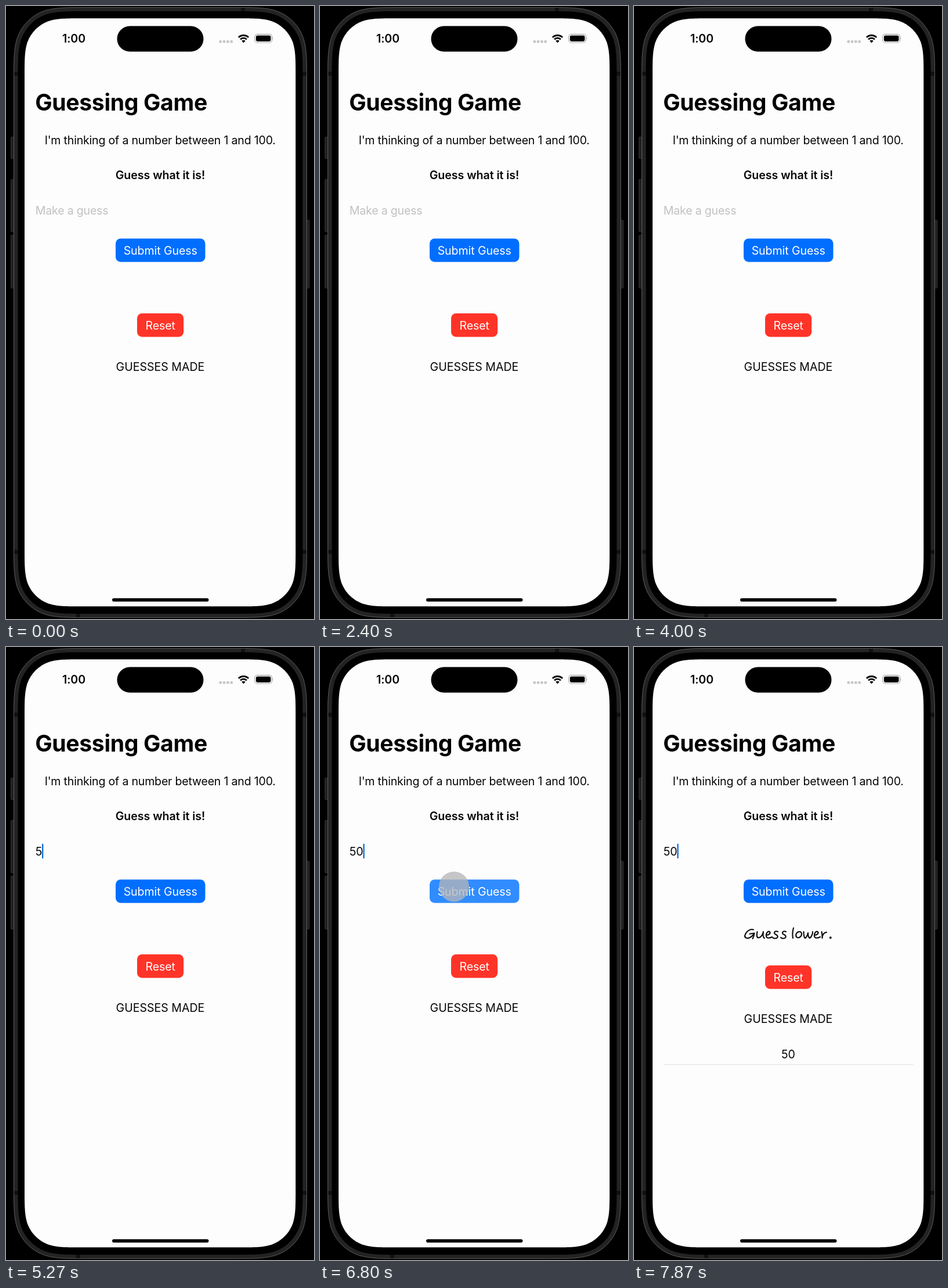
Animation of 531 by 1055 pixels, one loop 8000 ms. Source, as an HTML page:

```html
<!DOCTYPE html>
<html lang="en">
<head>
<meta charset="utf-8">
<title>Guessing Game</title>
<style>
  html, body { margin: 0; width: 100%; height: 100%; overflow: hidden; background: #000; }
  svg { display: block; width: 531px; height: 1055px; }
  text {
    font: 400 19.6px Inter, "Liberation Sans", sans-serif;
    font-optical-sizing: none;
    letter-spacing: -.1px;
    fill: #060606;
  }
  .mid { text-anchor: middle; }
  .semi { font-weight: 600; letter-spacing: -.05px; }
  .body { letter-spacing: -.22px; }
  .title { font-size: 39.2px; font-weight: 700; letter-spacing: -.36px; fill: #000; }
  .label { fill: #fff; }
  .hand { fill: none; stroke: #0a0a0a; stroke-width: 2.1; stroke-linecap: round; stroke-linejoin: round; }
</style>
</head>
<body>
<svg viewBox="0 0 531 1055">
  <defs>
    <path id="e" d="M228 496C232 496 236 493 234 490.300C231 488 227 493 228 498C229 502 234 501 238 499"/>
    <path id="s" d="M248 490C244 488 240 491 243 494C248 496 249 499 246 501C243 502 240 501 239 500"/>
  </defs>

  <g fill="#202021" stroke="#3a3a3b" stroke-width=".8">
    <rect x="8.500" y="225.500" width="8" height="37" rx="1.500"/>
    <rect x="8.500" y="298.500" width="8" height="90" rx="1.500"/>
    <rect x="8.500" y="394.500" width="8" height="91" rx="1.500"/>
    <rect x="515" y="368.500" width="8" height="117" rx="1.500"/>
  </g>
  <path id="shell" fill="#232324" stroke="#5c5c5d" stroke-width="1"/>
  <g fill="#111112">
    <rect x="14" y="113" width="7" height="7"/>
    <rect x="511" y="113" width="7" height="7"/>
    <rect x="14" y="936" width="7" height="7"/>
    <rect x="511" y="936" width="7" height="7"/>
    <rect x="405" y="3" width="7" height="6"/>
    <rect x="121" y="1046" width="7" height="6"/>
  </g>
  <path id="bezel" fill="#000"/>
  <path id="screen" fill="#fdfdfd"/>

  <text class="mid semi" x="117" y="63.300">1:00</text>
  <rect x="191.500" y="34.500" width="149" height="44" rx="22"/>
  <g fill="#c6c6c8">
    <rect x="367.500" y="59" width="4.600" height="4.400" rx="1.500"/>
    <rect x="373.800" y="59" width="4.600" height="4.400" rx="1.500"/>
    <rect x="380.100" y="59" width="4.600" height="4.400" rx="1.500"/>
    <rect x="386.400" y="59" width="4.600" height="4.400" rx="1.500"/>
  </g>
  <g fill="none" stroke="#000" stroke-width="2.900">
    <path d="M400.900 54.100a12.100 12.100 0 0 1 17.200 0"/>
    <path d="M404.100 57.400a7.600 7.600 0 0 1 10.800 0"/>
    <path d="M409.500 63.400l-3.200-3.300a4.500 4.500 0 0 1 6.400 0z" fill="#000" stroke="none"/>
  </g>
  <rect x="428.800" y="48.600" width="29.800" height="14.400" rx="4.600" fill="none" stroke="#a2a2a3" stroke-width="1.100"/>
  <rect x="430.900" y="50.700" width="25.600" height="10.200" rx="2.800"/>
  <path d="M459.700 53.500q1.700 2.300 0 4.600z" fill="#a2a2a3"/>

  <text class="title" x="50.200" y="180.300">Guessing Game</text>
  <text class="mid body" x="265.700" y="237.800">I'm thinking of a number between 1 and 100.</text>
  <text class="mid semi" x="266" y="297.600">Guess what it is!</text>
  <text id="field" class="body" x="50.800" y="358.900"></text>
  <rect id="caret" y="338.500" width="2.300" height="25.500" rx="1.100" fill="#0a6bd8"/>

  <rect id="submit" x="189" y="400.200" width="154.500" height="40.300" rx="8.500"/>
  <text class="mid label" x="266.200" y="427.800">Submit Guess</text>

  <g id="hint">
    <g class="hand" role="img" aria-label="Guess lower.">
      <path d="M206 486.500C200 484.500 193 490 191.300 496C190 501 195 502.500 200 500C204 498 206 495 207.500 492.500L199.500 493.800M207.500 492.500C207 497 206 499.500 204.500 502"/>
      <path d="M212.500 490C211 496 211.500 500.500 215 500.500C219 500 222 495 223 490C222 496 222 500 225 501"/>
      <use href="#e"/><use href="#s"/><use href="#s" x="14"/>
      <path d="M275 483.500C273 490 273 496 274 501"/>
      <path d="M285 490C280 490 278 496 280 499C283 502 289 499 289 494C289 491 287 490 285 490"/>
      <path d="M292.500 490C292.500 495 293 500 295 501C298 500 299 496 300 492C300 497 301 500 303 501C306 499 308 494 308 490"/>
      <use href="#e" x="83"/>
      <path d="M323.500 490C324.500 494 324.500 498 324.500 501C324.500 496 327 491 332 491"/>
      <circle cx="338.800" cy="500.300" r=".9"/>
    </g>
    <text class="mid" x="265.800" y="708.200">50</text>
    <path d="M51 718.600H481" stroke="#e2e2e3" stroke-width="1.300"/>
  </g>

  <g id="below">
    <rect x="226" y="529" width="80.200" height="40.600" rx="8.500" fill="#ff3428"/>
    <text class="mid label" x="266.200" y="556.900">Reset</text>
    <text class="mid" x="266" y="628.200" style="letter-spacing:-.03px">GUESSES MADE</text>
  </g>

  <circle id="touch" r="26" fill="#b6b6b9"/>
  <rect x="183" y="1019.200" width="166.500" height="5.800" rx="2.900"/>
</svg>
<script>
const LOOP = 8000;
const FOCUS = 3300, FIRST = 4830, SECOND = 5700, SEND = 6870;
const $ = id => document.getElementById(id);
const clamp = v => Math.max(0, Math.min(1, v));
const ramp = (t, a, b) => clamp((t - a) / (b - a));
const ease = v => v * v * (3 - 2 * v);
const mix = (a, b, v) => a + (b - a) * v;

// Rounded rectangle with continuous-curvature corners.
function squircle(x, y, w, h, r) {
  const steps = [
    [1.5287, 0], [1.0885, 0], [.8684, 0], [.6315, .0749],
    [.3728, .1691], [.1691, .3728], [.0749, .6315],
    [0, .8684], [0, 1.0885], [0, 1.5287]
  ];
  const corner = (right, low) => steps.map(([u, v]) => [
    right ? x + w - u * r : x + u * r,
    low ? y + h - v * r : y + v * r
  ]);
  const pts = [
    corner(false, false), corner(false, true).reverse(),
    corner(true, true), corner(true, false).reverse()
  ];
  return pts.map((p, i) => (i ? "L" : "M") + p[0] + "C" + p.slice(1).join(" ")).join("") + "Z";
}

$("shell").setAttribute("d", squircle(13.5, 2.5, 505, 1050, 82));
$("bezel").setAttribute("d", squircle(20.5, 9, 491, 1037, 76));
$("screen").setAttribute("d", squircle(32, 21.3, 467.3, 1012, 65));

// Caret blink: solid, fade out, short gap, fade in.
function blink(age) {
  const p = age % 1000;
  return 1 - ease(ramp(p, 500, 700)) + ease(ramp(p, 800, 960));
}

function caretAlpha(t) {
  if (t < FOCUS) return 0;
  if (t < FIRST) return blink(t - FOCUS);
  if (t < SECOND) return blink(t - FIRST);
  return t < 6510 ? 1 : blink(t - 6510);
}

function drawTouch(t) {
  const first = t < 5000;
  const go = ease(ramp(t, 6380, 6750));
  const seen = first
    ? ramp(t, 2560, 2780) * (1 - ramp(t, 3150, 3350))
    : ramp(t, 6250, 6490) * (1 - ramp(t, 7080, 7330));
  const touch = $("touch");
  touch.setAttribute("cx", first ? 213.2 : mix(196, 231, go));
  touch.setAttribute("cy", first ? 342.8 : mix(388.6, 412.4, go));
  touch.setAttribute("opacity", .76 * seen);
}

function draw(t) {
  const typed = t < FIRST ? "" : t < SECOND ? "5" : "50";
  const field = $("field");
  field.textContent = typed || "Make a guess";
  field.style.fill = typed ? "#060606" : "#c1c1c3";

  const caret = $("caret");
  caret.setAttribute("x", [50.2, 62, 74.4][typed.length]);
  caret.setAttribute("opacity", caretAlpha(t));

  const press = ramp(t, 6480, 6560) * (1 - ramp(t, SEND, 7230));
  $("submit").setAttribute("fill", `rgb(${mix(0, 48, press)},${mix(110, 140, press)},255)`);

  const sent = t >= SEND;
  $("hint").setAttribute("visibility", sent ? "visible" : "hidden");
  $("below").setAttribute("transform", `translate(0 ${sent ? 18.9 : 0})`);
  drawTouch(t);
}

const start = performance.now();
function tick() {
  draw((performance.now() - start) % LOOP);
  requestAnimationFrame(tick);
}
tick();
</script>
</body>
</html>
```
